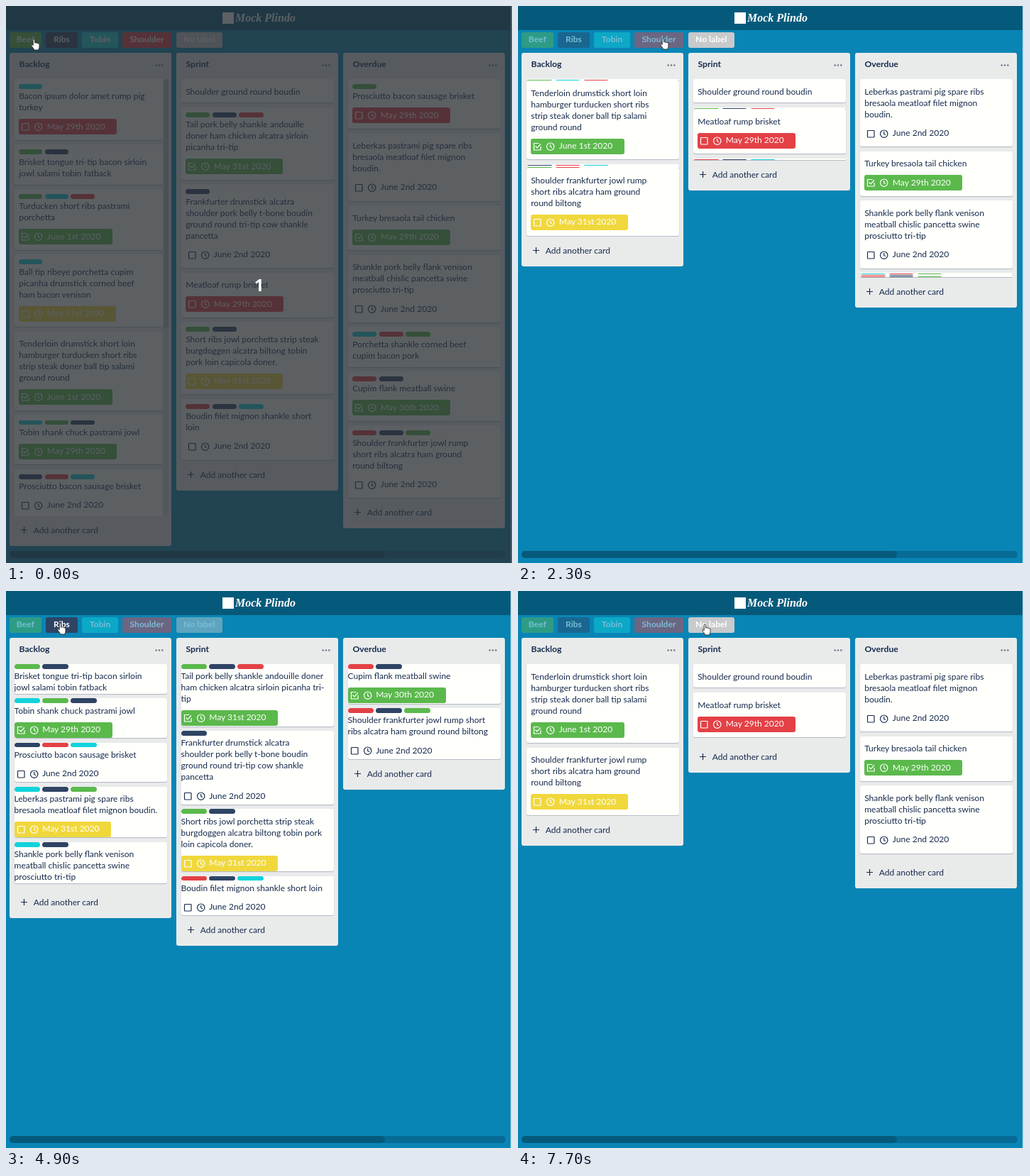
Animation of 713 by 785 pixels, one loop 8 s. Source, as an HTML page:

```html
<!DOCTYPE html>
<html lang="en">
<head>
<meta charset="utf-8">
<title>Board</title>
<style>
  html, body { margin: 0; width: 100%; height: 100%; overflow: hidden; }
  body {
    position: relative; background: #0985b5; color: #172b4d;
    font: 12.06px/16px Lato, "Open Sans", sans-serif;
  }
  .abs { position: absolute; }
  header { position: absolute; inset: 0 0 auto; height: 34px; background: #055a7b; }
  .mark { left: 305px; top: 9px; width: 16px; height: 16px; background: #fff; }
  .name {
    left: 323px; top: 7px; color: #fff; white-space: nowrap;
    font: italic bold 16px/20px "Liberation Serif", "Noto Serif", serif;
  }
  .tag {
    position: absolute; top: 37px; height: 22.3px; border-radius: 3px;
    font-weight: bold; line-height: 20.6px; text-align: center; color: #fff;
  }
  .off { opacity: .45; }
  .list {
    position: absolute; top: 66.3px; width: 228px; border-radius: 3px;
    background: #e9ebeb;
  }
  h2 { margin: 0; padding-left: 13.5px; height: 36.7px; font-size: 12.2px; line-height: 32.6px; }
  .dots { position: absolute; right: 11px; top: 15.5px; fill: #6b778c; }
  .cards { max-height: 615px; overflow: hidden; padding: 0 6.5px 1px; }
  .cards.long { padding-right: 12.5px; }
  .bar { position: absolute; left: 217px; top: 36.7px; width: 7px; height: 615px; border-radius: 3px; background: #091e4214; }
  .thumb { border-radius: 3px; background: #091e4222; }
  .add { height: 42px; line-height: 40px; padding-left: 33.7px; }
  .add svg { position: absolute; left: 15.5px; margin-top: 15px; }
  .card {
    overflow: hidden; margin-bottom: 6.5px; border-radius: 3px;
    background: #fffffc; box-shadow: 0 1px 1px #091e4240;
  }
  .card:last-child { margin-bottom: 0; }
  .card.gone { height: 0; margin-bottom: 0; }
  .labels { display: flex; gap: 3.35px; height: 6.7px; }
  .labels i { width: 17%; border-radius: 4px; }
  .text { margin-top: 3.3px; white-space: pre; }
  .text span, .date span { position: relative; top: -.8px; }
  .date {
    display: flex; width: max-content; height: 22px; margin-top: 7.3px; margin-bottom: .4px;
    padding-right: 16.5px; border-radius: 3px; line-height: 22px; white-space: nowrap;
  }
  .date svg { width: 39.7px; height: 22px; flex: none; }
  .done, .late, .soon { color: #fff; }
  .done { background: #5bb94c; }
  .late { background: #e34146; }
  .soon { background: #f0d83c; }
  svg.line { fill: none; stroke: currentColor; stroke-width: 1.2; }
  .rail { left: 5px; top: 768px; width: 699px; height: 10px; border-radius: 5px; background: #076c95; }
  .grip { width: 529px; height: 10px; border-radius: 5px; background: #055a7b; }
  .edge { left: 711px; top: 0; width: 2px; height: 785px; background: #c4dfe9; }
  #dim {
    position: absolute; inset: 0; background: rgba(42, 46, 52, .76); color: #fff;
    font: bold 24px/785px "Open Sans", "Noto Sans", sans-serif; text-align: center;
  }
  #hand { position: absolute; left: 0; top: 0; }
</style>
</head>
<body>
<header><div class="abs mark"></div><div class="abs name">Mock Plindo</div></header>
<div id="board"></div>
<div class="abs rail"><div class="grip"></div></div>
<div class="abs edge"></div>
<div id="dim">1</div>
<svg id="hand" width="13" height="17" viewBox="0 0 13 17">
  <path d="M3.2 9.5V2.2C3.2.4 5.6.4 5.6 2.2V6.2C6 5.3 7.6 5.4 7.8 6.4C8.3 5.7 9.7 5.9 9.9 7C10.6 6.4 12 6.8 12 8.2V11.5C12 13 11 13.8 11 16H4.6C4.4 14 1.9 12.2 .8 9.6C.3 8.2 2 7.6 3.2 9.5Z"
    fill="#fff" stroke="#222" stroke-width=".9"/>
</svg>
<script>
const LOOP = 8000, STEP = 100, PAD = 7.1;

// key: [title, colour, left, width]
const TAGS = {
  b: ['Beef', '#5bb94c', 5, 44.5],
  r: ['Ribs', '#2e4464', 56, 45],
  k: ['Tobin', '#10d3dc', 107, 51],
  s: ['Shoulder', '#e34146', 164, 69],
  n: ['No label', '#c8cacb', 240, 64.5]
};

// Breaks in text: / always, + only with padding, * and ~ only without (~ adds no space)
const SHORT = {
  turkey: 'Turkey bresaola tail chicken',
  pros: 'Prosciutto bacon sausage brisket',
  leber: 'Leberkas pastrami pig spare ribs/bresaola meatloaf filet mignon+boudin.',
  shank: 'Shankle pork belly flank venison/meatball chislic pancetta swine/prosciutto tri-tip',
  porch: 'Porchetta shankle corned beef+cupim*bacon pork',
  should: 'Shoulder frankfurter jowl rump+short*ribs alcatra ham ground+round biltong'
};

// [labels, state and date, text]
const LISTS = [
  ['Backlog', [
    ['k', 'late May 29th', 'Bacon ipsum dolor amet rump pig/turkey'],
    ['br', '', 'Brisket tongue tri-tip bacon sirloin/jowl salami tobin fatback'],
    ['bks', 'done June 1st', 'Turducken short ribs pastrami/porchetta'],
    ['k', 'soon May 31st', 'Ball tip ribeye porchetta cupim/picanha drumstick corned beef+ham*bacon venison'],
    ['n', 'done June 1st', 'Tenderloin drumstick short loin/hamburger turducken short ribs+strip*steak doner ball tip salami+ground*round'],
    ['kbr', 'done May 29th', 'Tobin shank chuck pastrami jowl'],
    ['rsk', 'open June 2nd', SHORT.pros],
    ['krb', 'soon May 31st', SHORT.leber],
    ['sk', 'open June 1st', SHORT.turkey],
    ['kr', '', SHORT.shank],
    ['bs', 'open June 1st', SHORT.porch],
    ['n', 'soon May 31st', SHORT.should]
  ]],
  ['Sprint', [
    ['n', '', 'Shoulder ground round boudin'],
    ['brs', 'done May 31st', 'Tail pork belly shankle andouille+doner*ham chicken alcatra sirloin+picanha tri-~tip'],
    ['r', 'open June 2nd', 'Frankfurter drumstick alcatra/shoulder pork belly t-bone boudin/ground round tri-tip cow shankle/pancetta'],
    ['n', 'late May 29th', 'Meatloaf rump brisket'],
    ['br', 'soon May 31st', 'Short ribs jowl porchetta strip steak/burgdoggen alcatra biltong tobin+pork*loin capicola doner.'],
    ['srk', 'open June 2nd', 'Boudin filet mignon shankle short+loin']
  ]],
  ['Overdue', [
    ['b', 'late May 29th', SHORT.pros],
    ['n', 'open June 2nd', SHORT.leber],
    ['n', 'done May 29th', SHORT.turkey],
    ['n', 'open June 2nd', SHORT.shank],
    ['ksb', '', SHORT.porch],
    ['sr', 'done May 30th', 'Cupim flank meatball swine'],
    ['srb', 'open June 2nd', SHORT.should]
  ]]
];

// Each click flips one tag
const CLICKS = [
  [600, 'b'], [1100, 'r'], [1700, 'k'], [2200, 's'], [2800, 'n'],
  [4000, 'b'], [4400, 'b'], [4900, 'r'], [5300, 'r'], [5700, 'k'],
  [6100, 'k'], [6600, 's'], [7100, 's'], [7500, 'n']
];

// Pointer: [time, x, y]
const MOVES = [
  [0, 35, 46], [800, 74, 45], [1300, 140, 43], [2000, 200, 45], [2600, 278, 47],
  [3300, 243, 45], [3400, 170, 46], [3500, 90, 46], [3600, -50, 46], [3800, 35, 43],
  [4700, 72, 45], [5500, 125, 46], [6400, 205, 45], [7300, 259, 46]
];

const board = document.getElementById('board');
const hand = document.getElementById('hand');
const dim = document.getElementById('dim');
const cards = [], tags = {};

function add(parent, cls, html = '', tag = 'div') {
  const el = document.createElement(tag);
  el.className = cls;
  el.innerHTML = html;
  return parent.appendChild(el);
}

function icons(done) {
  const box = done
    ? '<path d="M14 11v5H4.5V6.5h7M6.5 10.5l2.500 2.500 5-5.500"/>'
    : '<rect x="4.5" y="6.5" width="9.5" height="9.5" rx=".8"/>';
  return `<svg class="line">${box}<circle cx="27.7" cy="11.2" r="5.2"/><path d="M27.7 8v3.4l2.3 1.3"/></svg>`;
}

function wrap(text, wide) {
  const flat = { '+': ' ', '*': ' ', '~': '' };
  return text.replace(/[\/+*~]/g, m => m === '/' || (m === '+') !== wide ? '\n' : flat[m]);
}

function addCard(box, [labels, due, text]) {
  const el = add(box, 'card');
  if (labels !== 'n') {
    const row = add(el, 'labels');
    for (const k of labels) add(row, '', '', 'i').style.background = TAGS[k][1];
  }
  const line = add(add(el, 'text'), '', '', 'span');
  if (due) {
    const state = due.slice(0, 4);
    add(el, 'date ' + state, `${icons(state === 'done')}<span>${due.slice(5)} 2020</span>`);
  }
  cards.push({ el, line, labels, text });
}

for (const k in TAGS) {
  const [title, colour, left, width] = TAGS[k];
  const el = tags[k] = add(board, 'tag', title);
  Object.assign(el.style, { background: colour, left: left + 'px', width: width + 'px' });
}

const lists = LISTS.map(([title, items], i) => {
  const el = add(board, 'list');
  el.style.left = 5 + i * 235 + 'px';
  add(el, '', title, 'h2');
  add(el, '', '<svg class="dots" width="12" height="3"><circle cx="1.7" cy="1.5" r="1.3"/><circle cx="6" cy="1.5" r="1.3"/><circle cx="10.3" cy="1.5" r="1.3"/></svg>');
  const box = add(el, 'cards');
  items.forEach(item => addCard(box, item));
  add(el, 'add', '<svg class="line" width="9" height="9"><path d="M4.5 0v9M0 4.5h9"/></svg>Add another card');
  const bar = add(el, 'bar');
  return { box, bar, thumb: add(bar, 'thumb') };
});

const ease = x => 1 - (1 - Math.min(x, 1)) ** 2;

// Entering cards grow their padding; leaving ones lose their height at once, then the padding
function drawCard(c, t) {
  const d = t - c.since;
  const pad = PAD * (c.shown ? ease(d / 200) : 1 - ease((d + 70) / 270));
  c.el.style.display = c.shown || d < 200 ? '' : 'none';
  c.el.classList.toggle('gone', !c.shown);
  c.el.style.padding = `${pad}px ${pad * .94}px`;
  c.line.textContent = wrap(c.text, pad < 2);
}

function draw(t) {
  const on = { b: true, r: true, k: true, s: true, n: true };
  for (const c of cards) { c.shown = true; c.since = -LOOP; }
  for (const [time, key] of CLICKS) {
    if (time > t) break;
    on[key] = !on[key];
    for (const c of cards) {
      const show = [...c.labels].some(k => on[k]);
      if (show !== c.shown) { c.shown = show; c.since = time; }
    }
  }
  for (const k in tags) tags[k].classList.toggle('off', !on[k]);
  for (const c of cards) drawCard(c, t);

  for (const { box, bar, thumb } of lists) {
    box.classList.remove('long');
    const long = box.scrollHeight > box.clientHeight + 1;
    box.classList.toggle('long', long);
    bar.style.display = long ? '' : 'none';
    thumb.style.height = 615 * 615 / box.scrollHeight + 'px';
  }

  const [, x, y] = MOVES.filter(m => m[0] <= t).pop();
  hand.style.transform = `translate(${x}px, ${y}px)`;
  dim.style.display = t < 100 ? '' : 'none';
}

let last = -1;
const start = performance.now();
function tick() {
  const t = Math.floor((performance.now() - start) % LOOP / STEP) * STEP;
  if (t !== last) draw(last = t);
  requestAnimationFrame(tick);
}
tick();
</script>
</body>
</html>
```
